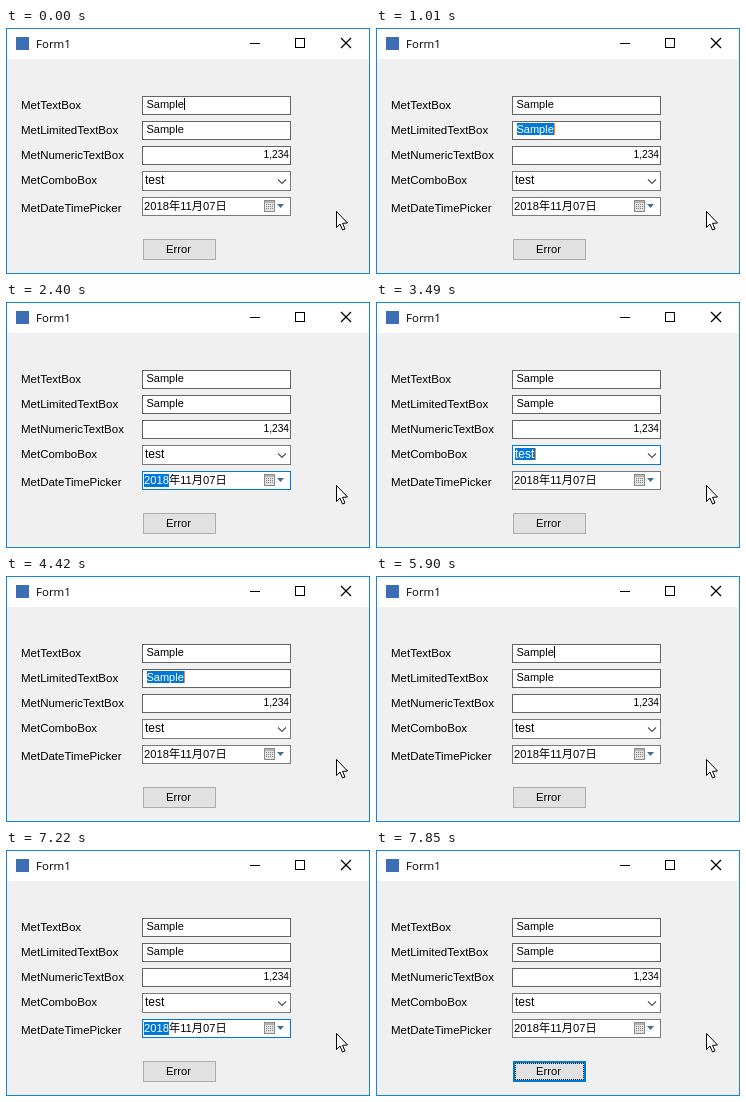
Write an HTML page with a canvas that moves like this. It is 364 by 246 pixels and loops after 8000 ms.

```html
<!DOCTYPE html>
<html lang="ja">
<head>
<meta charset="utf-8">
<title>Form1</title>
<style>
html, body { margin: 0; width: 100%; height: 100%; overflow: hidden; background: #f0f0f0; }
canvas { display: block; width: 364px; height: 246px; }
</style>
</head>
<body>
<canvas id="stage" width="364" height="246"></canvas>
<script>
const ctx = document.getElementById('stage').getContext('2d');
const LOOP = 8000;
const BLUE = '#0078d7';
const INVERTED = '#ff8728';
const FACE = '"Liberation Sans", "Noto Sans CJK JP", "Noto Sans CJK", sans-serif';

// Start time and focused control; "idle" is the text box with its caret blinked off.
const focusSteps = [
  [0, 'text'], [1010, 'limited'], [1470, 'numeric'], [1950, 'combo'],
  [2400, 'date'], [3490, 'combo'], [3880, 'numeric'], [4420, 'limited'],
  [4890, 'text'], [5370, 'idle'], [5900, 'text'], [5980, 'limited'],
  [6370, 'numeric'], [6830, 'combo'], [7220, 'date'], [7850, 'button']
];

function rect(x, y, w, h, color) {
  ctx.fillStyle = color;
  ctx.fillRect(x, y, w, h);
}

function box(x, y, w, h, border, fill = '#fff', line = 1) {
  rect(x, y, w, h, border);
  rect(x + line, y + line, w - 2 * line, h - 2 * line, fill);
}

function caret(x, y, color = '#000') {
  rect(x, y, 1, 12, color);
}

function selection(x, y, w) {
  rect(x, y, w, 12, BLUE);
  caret(x + w, y, INVERTED);
}

function text(str, x, y, size = 11, color = '#000', align = 'left', face = FACE) {
  ctx.font = `${size}px ${face}`;
  ctx.textAlign = align;
  ctx.fillStyle = color;
  ctx.fillText(str, x, y);
}

function path(points, { fill, stroke, width = 1, close = false }) {
  ctx.beginPath();
  points.forEach(([x, y]) => ctx.lineTo(x, y));
  if (close) ctx.closePath();
  if (fill) {
    ctx.fillStyle = fill;
    ctx.fill();
  }
  if (stroke) {
    ctx.strokeStyle = stroke;
    ctx.lineWidth = width;
    ctx.stroke();
  }
}

function drawWindow() {
  box(0, 0, 364, 246, '#1883d7', '#f0f0f0');
  rect(1, 1, 362, 30, '#fff');
  rect(10, 9, 13, 13, '#3c6eb4');
  text('Form1', 30, 20, 11.5, '#000', 'left', '"Open Sans", sans-serif');
  rect(244, 15, 10, 1, '#000');
  box(289, 10, 10, 10, '#000');
  path([[335, 10], [345, 20]], { stroke: '#000', width: 1.2 });
  path([[345, 10], [335, 20]], { stroke: '#000', width: 1.2 });
}

function drawLabels() {
  const labels = [
    ['MetTextBox', 81], ['MetLimitedTextBox', 106], ['MetNumericTextBox', 131],
    ['MetComboBox', 156], ['MetDateTimePicker', 184]
  ];
  labels.forEach(([name, y]) => text(name, 15, y, 11.5));
}

function drawTextBoxes(focus) {
  [68, 93, 118].forEach(y => box(136, y, 149, 19, '#646464'));

  text('Sample', 140.5, 80);
  if (focus === 'text') caret(178, 70);

  const selected = focus === 'limited';
  if (selected) selection(141, 95, 37);
  text('Sample', 140.5, 105, 11, selected ? '#fff' : '#000');

  const editing = focus === 'numeric';
  text(editing ? '1234' : '1,234', 283, 130, 10.2, '#000', 'right');
  if (editing) caret(259, 120);
}

function drawCombo(focused) {
  box(136, 143, 149, 20, focused ? BLUE : '#7a7a7a');
  if (focused) selection(139, 146, 20);
  text('test', 139, 156, 12, focused ? '#fff' : '#000');
  path([[272, 151.5], [276, 155.5], [280, 151.5]], { stroke: '#505050', width: 1.1 });
}

function drawDate(focused) {
  box(136, 169, 149, 19, focused ? BLUE : '#7a7a7a');
  if (focused) rect(138, 172, 25, 13, BLUE);
  text('2018', 138, 182, 11.2, focused ? '#fff' : '#000');
  text('年11月07日', 163, 182, 11.2);

  box(258, 172, 11, 12, '#8a8a8a', '#e2e2e2');
  rect(259, 173, 9, 2, '#b4b4b4');
  for (let row = 0; row < 3; row++) {
    for (let col = 0; col < 4; col++) {
      rect(260 + col * 2, 176 + row * 2, 1, 1, '#858585');
    }
  }
  path([[271, 176], [278, 176], [274.5, 180]], { fill: '#41708f', close: true });
}

function drawButton(focused) {
  box(137, 211, 73, 21, focused ? BLUE : '#adadad', '#e1e1e1', focused ? 2 : 1);
  if (focused) {
    for (let x = 139; x < 208; x += 2) {
      rect(x, 213, 1, 1, '#000');
      rect(x, 229, 1, 1, '#000');
    }
    for (let y = 213; y < 230; y += 2) {
      rect(139, y, 1, 1, '#000');
      rect(207, y, 1, 1, '#000');
    }
  }
  text('Error', 172.5, 225, 11.2, '#000', 'center');
}

function drawPointer() {
  path([
    [330.5, 183.5], [330.5, 199.5], [334, 196], [336.5, 202], [339, 201],
    [336.5, 195.3], [341.5, 195]
  ], { fill: '#fff', stroke: '#000', close: true });
}

function draw() {
  const now = performance.now() % LOOP;
  const focus = focusSteps.filter(([start]) => start <= now).pop()[1];
  drawWindow();
  drawLabels();
  drawTextBoxes(focus);
  drawCombo(focus === 'combo');
  drawDate(focus === 'date');
  drawButton(focus === 'button');
  drawPointer();
  requestAnimationFrame(draw);
}

draw();
</script>
</body>
</html>
```
